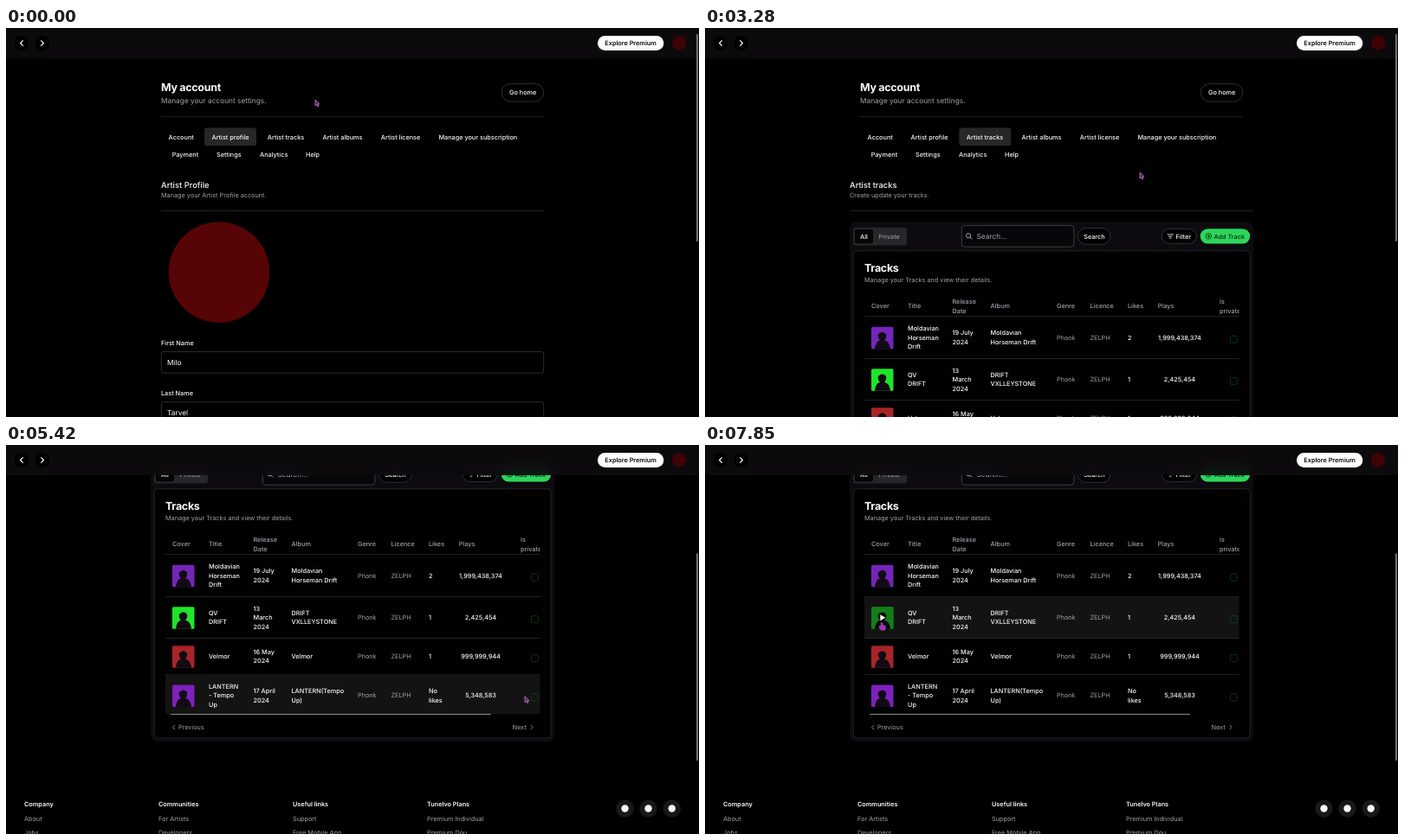
An HTML page for the animation above (8 s loop, 800 px wide and 450 px high).

```html
<!DOCTYPE html>
<html lang="en">
<head>
<meta charset="utf-8">
<title>Artist account</title>
<style>
  html, body { margin: 0; width: 100%; height: 100%; overflow: hidden; background: #000; }
  svg { position: absolute; inset: 0; width: 800px; height: 450px; font-family: Inter, sans-serif; text-rendering: geometricPrecision; }
  text { white-space: pre; }
  #bar { position: absolute; width: 800px; height: 35px; background: rgba(13, 11, 15, .93); backdrop-filter: blur(6px); }
</style>
</head>
<body>
<svg id="content" viewBox="0 0 800 450"></svg>
<div id="bar"></div>
<svg id="overlay" viewBox="0 0 800 450"></svg>
<script>
const LOOP = 8000, FPS = 7;
const WHITE = '#fafafa', MUTED = '#a1a1aa', LINE = '#29292c', PANEL = '#0d0b0f', RING = '#424247';
const SMALL = 7.29, BASE = 8.33, LARGE = 9.375, TITLE = 12.5, LEADING = 10.42;

// Markup helpers; text is centred vertically on y, "|" breaks lines.
function text(x, y, content, { size = SMALL, weight = 500, fill = WHITE, anchor = 'start', spacing = 0 } = {}) {
  const lines = content.split('|');
  return lines.map((line, i) => {
    const baseline = y + (i - (lines.length - 1) / 2) * LEADING + size * 0.36;
    return `<text x="${x}" y="${baseline}" font-size="${size}" font-weight="${weight}" fill="${fill}" text-anchor="${anchor}" letter-spacing="${spacing}em">${line}</text>`;
  }).join('');
}
const muted = (x, y, content, size = SMALL) => text(x, y, content, { size, weight: 400, fill: MUTED });
const title = (x, y, content) => text(x, y, content, { size: TITLE, weight: 700, spacing: -0.025 });
const rect = (x, y, w, h, r, fill, stroke = 'none', extra = '') =>
  `<rect x="${x}" y="${y}" width="${w}" height="${h}" rx="${r}" fill="${fill}" stroke="${stroke}" stroke-width=".7" ${extra}/>`;
const circle = (x, y, r, fill, extra = '') => `<circle cx="${x}" cy="${y}" r="${r}" fill="${fill}" ${extra}/>`;
const stroke = (d, color, width = 0.8) =>
  `<path d="${d}" fill="none" stroke="${color}" stroke-width="${width}" stroke-linecap="round" stroke-linejoin="round"/>`;
const rule = (x1, x2, y) => `<path d="M${x1} ${y}H${x2}" stroke="${LINE}" stroke-width=".8"/>`;
const chevron = (x, y, dir, size, color, width) =>
  stroke(`M${x - dir * size / 2} ${y - size}l${dir * size} ${size}l${-dir * size} ${size}`, color, width);
const group = (id, body) => `<g id="${id}">${body}</g>`;

const TABS = [
  [187.6, 126, 'Account'], [237.5, 126, 'Artist profile'], [301.8, 126, 'Artist tracks'],
  [365.5, 126, 'Artist albums'], [432.8, 126, 'Artist license'], [499.4, 126, 'Manage your subscription'],
  [191.7, 146.7, 'Payment'], [243, 146.7, 'Settings'], [293, 146.7, 'Analytics'], [346, 146.7, 'Help']
];

const ROWS = [
  { top: 333.5, bottom: 382.5, y: 358, name: 'Moldavian|Horseman|Drift', date: '19 July|2024', album: 'Moldavian|Horseman Drift', likes: '2', plays: '1,999,438,374', color: '#7325b8' },
  { top: 382.5, bottom: 430.5, y: 406.5, name: 'QV|DRIFT', date: '13|March|2024', album: 'DRIFT|VXLLEYSTONE', likes: '1', plays: '2,425,454', color: '#1fe52a' },
  { top: 430.5, bottom: 472.5, y: 451.5, name: 'Velmor', date: '16 May|2024', album: 'Velmor', likes: '1', plays: '999,999,944', color: '#a82428' },
  { top: 472.5, bottom: 518, y: 496.7, name: 'LANTERN|- Tempo|Up', date: '17 April|2024', album: 'LANTERN(Tempo|Up)', likes: 'No|likes', plays: '5,348,583', color: '#7d20bd' }
];

const FOOTER = [
  [21, 'Company', 'About', 'Jobs'],
  [176, 'Communities', 'For Artists', 'Developers'],
  [331, 'Useful links', 'Support', 'Free Mobile App'],
  [486, 'Tunelvo Plans', 'Premium Individual', 'Premium Dou']
];

const accountHead = () =>
  title(179, 68, 'My account') +
  muted(179, 84, 'Manage your account settings.', BASE) +
  rect(572.2, 64.5, 48.5, 20.5, 10.2, '#000', RING) + text(581, 74.8, 'Go home') +
  rule(179, 621, 102.5) +
  rect(229, 115.5, 60, 20.8, 3, '#27272a', 'none', 'id="activeTab"') +
  TABS.map(tab => text(...tab)).join('');

const sectionHead = (x, right, name, detail) =>
  text(x, 181.3, name, { size: LARGE }) + muted(x, 193.8, detail) + rule(x, right, 211.5);

const field = (y, label, value) =>
  text(179, y, label) + rect(179.3, y + 10.4, 441.4, 24.7, 2.5, '#000', RING) +
  text(186, y + 22.8, value, { size: BASE, weight: 400 });

const profile = () =>
  sectionHead(179, 621, 'Artist Profile', 'Manage your Artist Profile account.') +
  circle(246, 282.5, 58.3, '#560406') +
  field(364, 'First Name', 'Milo') + field(422.3, 'Last Name', 'Tarvel');

const loader = () =>
  sectionHead(179, 621, 'Artist tracks', 'Create update your tracks.') +
  rect(179, 224.5, 442, 300, 8, PANEL) +
  [390.2, 400, 409.8].map(x => circle(x, 362, 3.7, WHITE, 'class="dot"')).join('');

const toolbar = () =>
  rect(171, 230.8, 62, 20.6, 3.5, '#27272a') + rect(173, 232.9, 21, 16.4, 2, '#050505') +
  text(179, 241, 'All') + text(200.5, 241, 'Private', { fill: '#92929a' }) +
  rect(296.3, 228.4, 129.6, 24.8, 3.5, '#070608', '#55555b') +
  stroke('M306.7 240.2a2.6 2.6 0 1 1-5.2 0a2.6 2.6 0 1 1 5.2 0M306 242.1l2 2', '#c5c5c9') +
  muted(313.5, 241, 'Search...', BASE) +
  rect(430.5, 231.5, 37.5, 18.8, 9.4, '#000', RING) + text(437.2, 241, 'Search') +
  rect(527.3, 232.4, 40, 17, 8.5, '#000', RING) +
  stroke('M534 238.8h6.4M535.2 241h4M536.4 243.2h1.6', WHITE) + text(543.5, 241, 'Filter') +
  rect(571.7, 232.2, 57.5, 17.2, 8.6, '#2dd65b') +
  stroke('M584.7 240.9a3.3 3.3 0 1 1-6.6 0a3.3 3.3 0 1 1 6.6 0M579.8 240.9h3.2M581.4 239.3v3.2', '#082c10') +
  text(587.4, 241, 'Add Track', { fill: '#082c10' });

const cover = ({ y, color }) =>
  rect(192, y - 12.3, 25.5, 25.5, 1.5, color) +
  `<path d="M196 ${y + 13.2}q1-9 6-10q-3-3-2-7q5-5 9 0q1 4-2 7q6 1 7 10z" fill="#120a14"/>`;

const row = (r, i) =>
  rect(184, r.top, 480, r.bottom - r.top, 0, '#141313', 'none', 'class="rowHover"') +
  cover(r) +
  group('play' + i,
    rect(192, r.y - 12.3, 25.5, 25.5, 1.5, '#000', 'none', 'opacity=".45"') +
    `<path d="M202.3 ${r.y - 3.2}l6 3.5l-6 3.5z" fill="#fff"/>`) +
  text(234, r.y, r.name) + text(285.5, r.y, r.date) + text(329.5, r.y, r.album) +
  muted(406, r.y, 'Phonk') + muted(444.5, r.y, 'ZELPH') + text(488, r.y, r.likes) +
  text(548, r.y, r.plays, { anchor: 'middle' }) +
  rect(606.4, r.y - 1.9, 8, 8, 1.8, 'none', '#10491f') +
  [642.4, 645, 647.6].map(x => circle(x, r.y, 0.75, WHITE)).join('') +
  (i < ROWS.length - 1 ? rule(184, 664, r.bottom) : '');

const tableHead = () =>
  [[192, 'Cover'], [234, 'Title'], [285.5, 'Release|Date'], [329.5, 'Album'], [406, 'Genre'],
   [444.5, 'Licence'], [488, 'Likes'], [522.7, 'Plays'], [594, 'Is|private']]
    .map(([x, label]) => text(x, 321.7, label, { fill: MUTED })).join('') + rule(184, 664, 333.5);

const footer = () =>
  FOOTER.map(([x, head, ...links]) =>
    text(x, 622, head, { weight: 600 }) + links.map((link, i) => muted(x, 639 + i * 16.6, link)).join('')).join('') +
  [714.5, 741.5, 768.7].map(x => circle(x, 627.5, 10.2, '#18181b') + circle(x, 627.5, 4.2, WHITE)).join('');

const tracks = () =>
  sectionHead(167, 633, 'Artist tracks', 'Create update your tracks.') +
  rect(167, 224.3, 466, 325.7, 8, PANEL) + toolbar() +
  rect(171.2, 257.8, 457.8, 288.2, 4, '#010101', '#303034') +
  title(184, 277, 'Tracks') + muted(184, 291.6, 'Manage your Tracks and view their details.') +
  `<g clip-path="url(#tableClip)">${group('table', tableHead() + ROWS.map(row).join(''))}</g>` +
  rect(190, 518, 370, 1.1, 0.5, '#8b8b8b', 'none', 'id="tableThumb"') +
  chevron(193.6, 533.5, -1, 2.2, MUTED) + muted(199, 533.6, 'Previous') +
  muted(584.5, 533.6, 'Next') + chevron(607, 533.5, 1, 2.2, MUTED) +
  footer();

const header = () =>
  circle(18, 17.5, 8.4, '#000') + circle(42, 17.5, 8.4, '#000') +
  chevron(18, 17.5, -1, 2.8, '#fff', 1.2) + chevron(42, 17.5, 1, 2.8, '#fff', 1.2) +
  rect(683, 9, 76.3, 17, 8.5, '#fff') + text(721.1, 17.4, 'Explore Premium', { weight: 600, fill: '#09090b', anchor: 'middle' }) +
  circle(777, 17.2, 8.2, '#3f0306');

const pointer = () =>
  group('arrow', '<path d="M0 0v7l1.6-1.4l1.1 2.3l1.2-.6l-1-2.2h2z" fill="#5d1a6b" stroke="#d58be0" stroke-width=".7"/>') +
  group('hand', '<path d="M-.8 0q.8-.9 1.6 0v2.4l3 .8q.7.3.6 1.1l-.5 2.7q-.3 1-1.2 1h-2.8q-.8 0-1.2-.7l-1.7-2.8q0-1 1-.8l1.2.6z" fill="#9c2bb0" stroke="#d58be0" stroke-width=".5"/>');

const el = id => document.getElementById(id);
el('content').innerHTML =
  '<defs><clipPath id="tableClip"><rect x="184" y="300" width="432.5" height="221"/></clipPath></defs>' +
  group('page', accountHead() + group('profile', profile()) + group('loader', loader()) + group('tracks', tracks()));
el('overlay').innerHTML =
  header() +
  rect(796.9, 7, 2, 240, 1, '#777', 'none', 'id="pageThumb"') +
  group('status', rect(-2, 439.5, 116, 12, 1.5, '#161618') +
    `<text x="1.5" y="447.4" font-size="5.95" font-family="Open Sans, sans-serif" fill="#56565a">localhost:3000/account/my/artist/tracks</text>`) +
  group('pointer', pointer());

// Keyframes are [tick, value...] with FPS ticks per second.
const POINTER = [[0, 357, 83], [6, 342, 104], [7, 342, 104], [9, 326, 128], [16, 326, 128], [20, 440, 150], [21, 440, 150],
  [23, 502, 167], [25, 502, 167], [26, 677, 302], [36, 677, 302], [39, 560, 285], [42, 456, 259], [46, 456, 259], [53, 204, 206]];
const SCROLL = [[28, 0], [31, 99.6], [35, 173.6], [38, 207]];
const TABLE_SCROLL = [[39, 0], [42, 49.6], [46, 49.6], [49, 0]];

function sample(keys, tick) {
  const next = keys.findIndex(key => key[0] > tick);
  if (next === 0) return keys[0].slice(1);
  if (next < 0) return keys[keys.length - 1].slice(1);
  const a = keys[next - 1], b = keys[next], f = (tick - a[0]) / (b[0] - a[0]);
  return a.slice(1).map((v, i) => v + (b[i + 1] - v) * f);
}

const show = (node, on) => node.setAttribute('display', on ? 'inline' : 'none');
const move = (id, x, y) => el(id).setAttribute('transform', `translate(${x} ${y})`);
const dots = document.querySelectorAll('.dot'), rowHovers = document.querySelectorAll('.rowHover');

function draw(time) {
  const tick = Math.floor((time + 8) * FPS / 1000);
  const view = tick < 15 ? 'profile' : tick < 18 ? 'loader' : 'tracks';
  const [x, y] = sample(POINTER, tick), [scroll] = sample(SCROLL, tick), [shift] = sample(TABLE_SCROLL, tick);

  for (const id of ['profile', 'loader', 'tracks']) show(el(id), id === view);
  move('page', 0, -scroll);
  move('table', -shift, 0);
  el('tableThumb').setAttribute('x', 190 + shift * 1.05);
  el('pageThumb').setAttribute('y', 7 + scroll * 0.571);
  el('pageThumb').setAttribute('height', view === 'loader' ? 257 : 240);
  el('activeTab').setAttribute('x', view === 'profile' ? 229 : 293.3);
  show(el('status'), tick >= 9 && tick < 19);

  dots.forEach((dot, i) => {
    const pulse = 0.5 + 0.5 * Math.cos((tick - 16) * 1.2 - (i - 1) * 2);
    dot.setAttribute('r', 3.6 + 0.5 * pulse);
    dot.setAttribute('opacity', 0.4 + 0.24 * pulse);
  });

  const pageY = y + scroll, inTable = view === 'tracks' && x > 184 && x < 616;
  let overCover = false;
  ROWS.forEach((r, i) => {
    const over = inTable && pageY > r.top && pageY < r.bottom;
    const covered = over && x + shift < 217.5;
    show(rowHovers[i], over);
    show(el('play' + i), covered);
    overCover = overCover || covered;
  });
  const overTab = scroll === 0 && y > 115 && y < 137 && x > 293 && x < 353;
  move('pointer', x, y);
  show(el('hand'), overCover || overTab);
  show(el('arrow'), !(overCover || overTab));
}

function loop() {
  draw(performance.now() % LOOP);
  requestAnimationFrame(loop);
}
loop();
</script>
</body>
</html>
```
